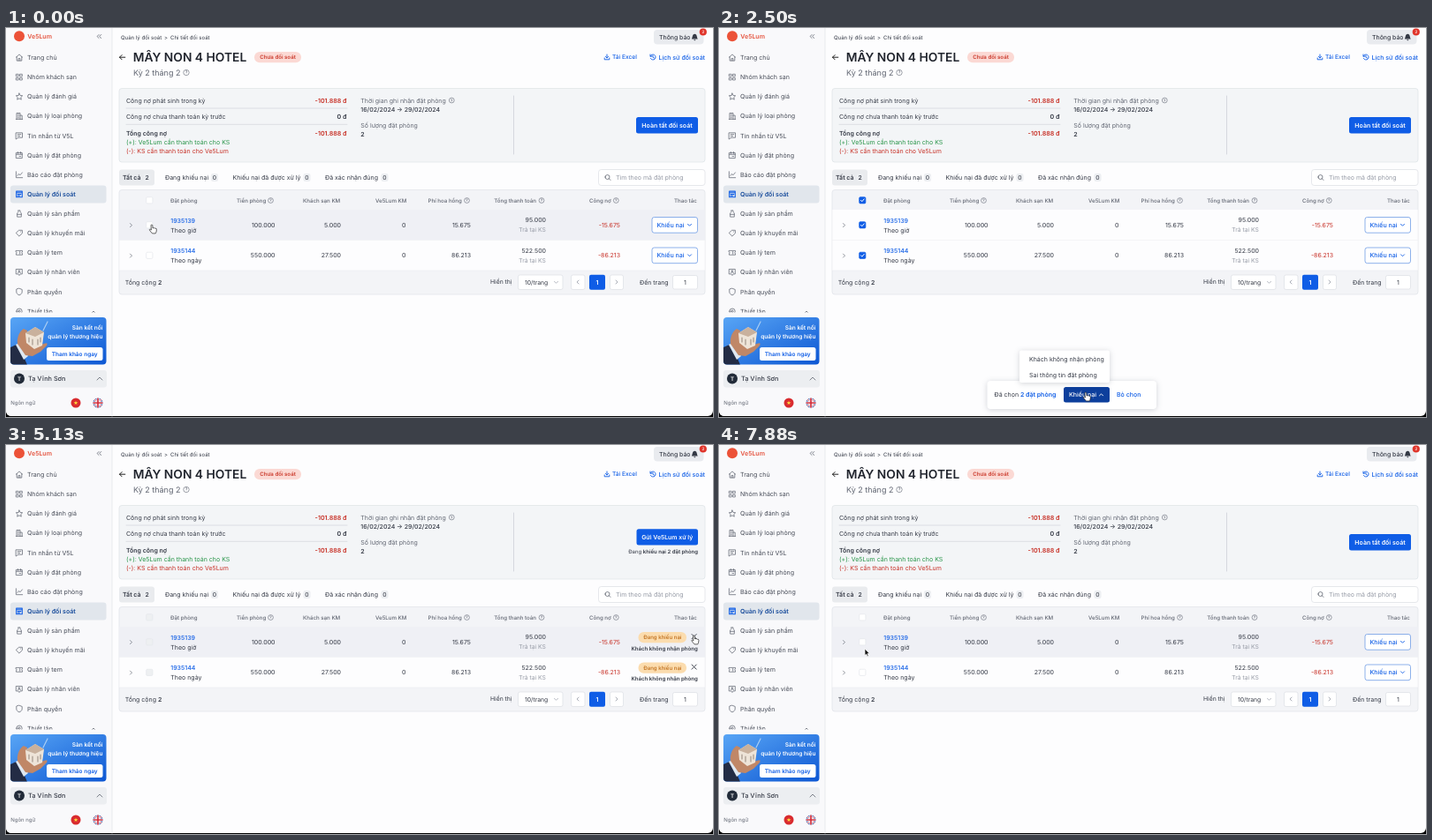
Write an HTML page that moves like this. It is 800 px wide and 441 px high and loops after 8000 ms.

```html
<!DOCTYPE html>
<html lang="vi">
<head>
<meta charset="utf-8">
<title>Đối soát</title>
<style>
html, body { margin: 0; width: 100%; height: 100%; overflow: hidden; background: #000; }
svg { display: block; width: 100%; height: 100%; font-family: Inter, Roboto, sans-serif; text-rendering: geometricPrecision; }
.soft { filter: drop-shadow(0 1px 3px rgba(30, 40, 60, .2)); }
</style>
</head>
<body>
<svg viewBox="0 0 800 441">
  <defs>
    <linearGradient id="sky" x2="1" y2="1"><stop stop-color="#58a5f5"/><stop offset="1" stop-color="#0d57d3"/></linearGradient>
    <clipPath id="menuClip"><path d="M0 0H120V322.5H0z"/></clipPath>
    <clipPath id="bannerClip"><rect x="5" y="328" width="108.5" height="53.5" rx="4"/></clipPath>
    <clipPath id="flagClip"><circle cx="104" cy="425" r="5.5"/></clipPath>
  </defs>
  <g id="page"></g>
  <g id="live"></g>
</svg>
<script>
const INK = '#343945', GREY = '#616672', PALE = '#969ba6', BLUE = '#0f5de6', RED = '#c72f25';
const BRAND = 'Ve5Lum';

// Text is placed by its vertical centre.
const text = (x, y, s, size = 7, weight = 400, fill = INK, anchor = 'start') =>
  `<text x="${x}" y="${y + size * .36}" font-size="${size}" font-weight="${weight}" fill="${fill}" text-anchor="${anchor}">${s}</text>`;
const right = (x, y, s, size, weight, fill) => text(x, y, s, size, weight, fill, 'end');
const mid = (x, y, s, size, weight, fill) => text(x, y, s, size, weight, fill, 'middle');
const box = (x, y, w, h, fill, r = 0, stroke = 'none', extra = '') =>
  `<rect x="${x}" y="${y}" width="${w}" height="${h}" rx="${r}" fill="${fill}" stroke="${stroke}" stroke-width=".7" ${extra}/>`;
const dot = (x, y, r, fill) => `<circle cx="${x}" cy="${y}" r="${r}" fill="${fill}"/>`;
const area = (d, fill) => `<path d="${d}" fill="${fill}"/>`;
const line = (x, y, d, stroke = GREY, w = .8) =>
  `<path transform="translate(${x} ${y})" d="${d}" fill="none" stroke="${stroke}" stroke-width="${w}" stroke-linecap="round" stroke-linejoin="round"/>`;
const help = (x, y, r = 2.9) =>
  `<circle cx="${x}" cy="${y}" r="${r}" fill="none" stroke="${GREY}" stroke-width=".6"/>` + mid(x, y, '?', r * 1.6, 500, GREY);
const DOWN = 'M-2-1 0 1 2-1', UP = 'M-2 1 0-1 2 1', NEXT = 'M-1-2 1 0-1 2', PREV = 'M1-2-1 0 1 2';
const ring = r => `M${-r} 0a${r} ${r} 0 1 1 ${2 * r} 0a${r} ${r} 0 1 1 ${-2 * r} 0z`;
const FRAME = 'M-3.3-3.3H3.3V3.3H-3.3z', SHIELD = 'M0-3.8 3.2-2.6V0C3.2 2 1.6 3.2 0 3.8-1.6 3.2-3.2 2-3.2 0V-2.6z';

const MENU = [
  ['Trang chủ', 'M-3.6-.3 0-3.6 3.6-.3M-2.8-1V3.6H2.8V-1M-.9 3.4V1H.9V3.4'],
  ['Nhóm khách sạn', 'M-3.3-3.3h2.4v2.4h-2.4zM.9-3.3h2.4v2.4H.9zM-3.3.9h2.4v2.4h-2.4zM.9.9h2.4v2.4H.9z'],
  ['Quản lý đánh giá', 'M0-3.7 1.1-1.3 3.7-1 1.8.8 2.3 3.4 0 2.1-2.3 3.4-1.8.8-3.7-1-1.1-1.3z'],
  ['Quản lý loại phòng', 'M-3 3.5V-3.5H1V3.5M1-.8H3.2V3.5M-3.7 3.5H3.7M-1.8-2H-.2M-1.8 0H-.2M-1.8 2H-.2'],
  ['Tin nhắn từ V5L', 'M-3.5-3.2H3.5V2.2H-1L-3.5 3.8zM-1.8-1.4H1.8M-1.8.4H.6'],
  ['Quản lý đặt phòng', 'M-3.3-2.6H3.3V3.4H-3.3zM-3.3-.8H3.3M-1.6-3.7V-1.8M1.6-3.7V-1.8M0 1.4H1.8'],
  ['Báo cáo đặt phòng', 'M-3.6-3.5V3.4H3.7M-2 1.2-.5-.8 1 .5 3.4-2.4'],
  ['Quản lý đối soát', FRAME + 'M-3.3-1.6H3.3M-1.8.2H1.8M-1.8 1.8H.4'],
  ['Quản lý sản phẩm', 'M-1-3.7H1V-2L2.3-.8V3.6H-2.3V-.8L-1-2zM-2.3.8H2.3'],
  ['Quản lý khuyến mãi', 'M0-3.4H3.4V0L0 3.5-3.5 0zM1.6-1.7h.2'],
  ['Quản lý tem', 'M-3.5-2.4H3.5V-.9C2.5-.9 2.5.9 3.5.9V2.4H-3.5V.9C-2.5.9-2.5-.9-3.5-.9zM.7-1.4V1.4'],
  ['Quản lý nhân viên', 'M-3.3-3.5H3.3V2H1.2L0 3.6-1.2 2H-3.3zM-1.7.8C-1-.5 1-.5 1.7.8M-.8-1.4a.8.8 0 1 0 1.6 0a.8.8 0 1 0-1.6 0'],
  ['Phân quyền', SHIELD],
  ['Thiết lập', ring(3.2) + ring(1.2)]
];

function banner() {
  return box(5, 328, 109, 54, 'url(#sky)') +
    area('M5 362 14 358 24 382H5z', '#232c45') + area('M11 359 16 356 25 372 20 376z', '#dfe8f2') +
    area('M13 358C12 350 16 343 20 341L24 343 23 349 40 359C45 357 48 356 46 360L39 367 30 372 22 371z', '#c08767') +
    area('M22 346 33 339 43 345 41 360 32 364 23 357z', '#eee4d8') + area('M22 346 33 339 43 345 33 350z', '#c9b19d') +
    line(0, 0, 'M26 351v5M30 353v6M36 353v6M39 351v5', '#a3978c', 1.2) +
    line(0, 0, 'M42 343 47 333', '#a9cdf3', 1.2) +
    right(109.5, 340, 'Sàn kết nối', 6.55, 600, '#fff') +
    right(109.5, 350, 'quản lý thương hiệu', 6.55, 600, '#fff') +
    box(46, 362, 63.5, 15, '#fff', 2.5) + mid(77.7, 369.5, 'Tham khảo ngay', 6.5, 600, BLUE);
}

function flags() {
  const cross = 'M-6 0H6M0-6V6', saltire = 'M-5-5 5 5M5-5-5 5';
  return dot(79, 425, 5.5, '#d92b2f') +
    area('M79 422.6 79.6 424.3H81.4L80 425.4 80.5 427 79 426 77.5 427 78 425.4 76.6 424.3H78.4z', '#ffdc3c') +
    '<g clip-path="url(#flagClip)">' + dot(104, 425, 6, '#2d4b9b') +
    line(104, 425, saltire, '#fff', 2) + line(104, 425, saltire, '#d3303d', .7) +
    line(104, 425, cross, '#fff', 3.2) + line(104, 425, cross, '#d3303d', 1.7) + '</g>';
}

function sidebar() {
  const items = MENU.map(([label, icon], i) => {
    const y = 33.5 + i * 22.13, on = i === 7;
    return (on ? box(5, y - 10, 108.5, 20, '#e1e6ec', 3) : '') +
      line(15, y, icon, on ? BLUE : GREY, on ? 1.1 : .75) +
      text(24, y, label, 7.05, on ? 600 : 400, on ? '#174b9b' : '#454a56');
  }).join('');
  return box(0, -10, 120, 450, '#f9f9fb', 6) + line(120, 0, 'M0 0V440', '#e4e6ea', .8) +
    dot(15, 9.3, 6, '#ec5238') + text(24.3, 9.5, BRAND, 7, 600, '#e5543f') +
    line(105.5, 9.5, 'M-.4-2-2.4 0-.4 2M2.2-2 .2 0 2.2 2') +
    `<g clip-path="url(#menuClip)">${items}${line(99, 322, UP)}</g>` +
    `<g clip-path="url(#bannerClip)">${banner()}</g>` +
    box(5, 388, 109, 19.5, '#eceef1', 3) + dot(15, 397.5, 6, '#222b39') + mid(15, 397.5, 'T', 6.2, 600, '#fff') +
    text(25, 397.5, 'Tạ Vĩnh Sơn', 7.3, 500) + line(106, 397.5, 'M-3 1.5 0-1.5 3 1.5') +
    text(5.3, 425, 'Ngôn ngữ', 6, 400, GREY) + flags();
}

function header() {
  return text(130, 11, 'Quản lý đối soát', 6.05) + text(179, 11, '&gt;', 6) + text(186, 11, 'Chi tiết đối soát', 6.05) +
    box(733, 2, 56.5, 16.5, '#e9ebef', 4) + text(739, 10.3, 'Thông báo', 6.9, 500) +
    area('M775.8 12.4C777 11 776.3 7 779.3 6.7 782.3 7 781.6 11 782.8 12.4zM778 13.2H780.6L779.3 14.5z', INK) +
    dot(788.8, 4.5, 4.1, '#e0352b') + mid(788.8, 4.5, '2', 4.6, 500, '#fff') +
    line(131.5, 33.2, 'M3.3 0H-3M-.4-2.6-3 0-.4 2.6', '#222', 1) +
    text(143.8, 33.2, 'MÂY NON 4 HOTEL', 13.8, 600, '#20242d') +
    box(281, 27, 53, 12.3, '#fbd9d4', 6.1) + mid(307.5, 33.2, 'Chưa đối soát', 6.1, 600, '#cb3a2c') +
    text(144, 50.3, 'Kỳ 2 tháng 2', 9, 400, GREY) + help(204, 50.5, 3.2) +
    line(680, 33, 'M0-3V1M-1.6-.6 0 1 1.6-.6M-2.8 1V2.8H2.8V1', BLUE, .9) + text(686, 33, 'Tải Excel', 6.6, 500, BLUE) +
    line(732, 33, 'M-2.8-1A3 3 0 1 1-2.6 1.5M-3-3V-.8H-1M0-1.5V.3L1.3 1', BLUE, .9) +
    right(791, 33, 'Lịch sử đối soát', 7, 500, BLUE);
}

function summary() {
  return box(128, 68.5, 663, 83.5, '#f3f5f7', 3, '#dde2e5') +
    text(136, 82, 'Công nợ phát sinh trong kỳ') + right(385.5, 82, '-101.888 đ', 7.1, 600, RED) +
    text(136, 100.5, 'Công nợ chưa thanh toán kỳ trước') + right(385.5, 100.5, '0 đ', 7.1, 600) +
    text(136, 119, 'Tổng công nợ', 7, 600) + right(385.5, 119, '-101.888 đ', 7.1, 600, RED) +
    line(136, 91, 'M0 0H250M0 18.3H250', '#cbcfd5', .6) +
    text(136, 129, `(+): ${BRAND} cần thanh toán cho KS`, 7, 400, '#269447') +
    text(136, 139, `(-): KS cần thanh toán cho ${BRAND}`, 7, 400, RED) +
    text(401.3, 82, 'Thời gian ghi nhận đặt phòng', 7, 400, GREY) + help(504.3, 82) +
    text(401.3, 92.5, '16/02/2024 → 29/02/2024', 7, 500) +
    text(401.3, 110.5, 'Số lượng đặt phòng', 7, 400, GREY) + text(401.3, 120.7, '2', 7, 600) +
    line(574.5, 77, 'M0 0V66', '#c8ccd3', .7);
}

function tabs() {
  const tab = (x, label, bx, n, w) => text(x, 169.5, label, 7, w) +
    box(bx - 4, 165, 8, 9, '#eceef1', 2) + mid(bx, 169.5, n, 6.8, w);
  return box(128, 160.5, 40, 18, '#e9ebee', 3) + tab(132, 'Tất cả', 159.5, 2, 600) +
    tab(180, 'Đang khiếu nại', 236, 0, 400) + tab(256.5, 'Khiếu nại đã được xử lý', 340.5, 0, 400) +
    tab(361, 'Đã xác nhận đúng', 428.5, 0, 400) +
    box(670.5, 160.5, 120.5, 18, '#fff', 3, '#dcdfe4') +
    line(680.5, 169, ring(2.5) + 'M1.8 1.8 3.5 3.5') + text(690, 169.5, 'Tìm theo mã đặt phòng', 7, 400, PALE);
}

function table() {
  const heads = [[186, 'Đặt phòng'], [261, 'Tiền phòng', 299.5], [336, 'Khách sạn KM'], [418, BRAND + ' KM'],
    [477.5, 'Phí hoa hồng', 521.5], [552.3, 'Tổng thanh toán', 606], [660, 'Công nợ', 690.3], [756, 'Thao tác']];
  return box(128, 183.5, 663, 118.5, '#f3f4f7', 3, '#e0e3e8') +
    heads.map(([x, s, h]) => text(x, 195.5, s, 6.15, 500, GREY) + (h ? help(h, 195.5) : '')).join('') +
    text(134.8, 288, 'Tổng cộng <tspan font-weight="600">2</tspan>') + text(548, 288, 'Hiển thị', 6.8) +
    box(579.5, 280, 50.5, 16.5, '#fff', 2, '#dcdfe4') + text(587, 288.3, '10/trang', 6.8) + line(622.5, 288.3, DOWN, PALE, .7) +
    box(639.5, 280, 15.5, 16.5, '#fff', 2, '#dcdfe4') + line(647, 288, PREV, PALE) +
    box(660, 279.8, 18, 17, BLUE, 2) + mid(669, 288.2, '1', 7, 600, '#fff') +
    box(683.5, 280, 15, 16.5, '#fff', 2, '#dcdfe4') + line(691, 288, NEXT, PALE) +
    text(717, 288, 'Đến trang') + box(754.5, 280.5, 28, 15.5, '#fff', 2, '#dcdfe4') + mid(768.5, 288.3, '1');
}

function check(y, state) {
  const on = state === 'on';
  return box(158.7, y - 3.6, 7.2, 7.2, on ? BLUE : state === 'off' ? '#eef0f2' : '#fff', 1.2, on ? BLUE : '#e4e7eb') +
    (on ? line(162.3, y, 'M-1.8 0-.5 1.4 1.9-1.4', '#fff', 1) : '');
}

const ROWS = [
  ['1935139', 'Theo giờ', '100.000', '5.000', '15.675', '95.000'],
  ['1935144', 'Theo ngày', '550.000', '27.500', '86.213', '522.500']
];
const ROW_TOP = 206, ROW_H = 34.5;

function row(i, checked, disputed, hover) {
  const [id, kind, price, promo, fee, total] = ROWS[i], y = ROW_TOP + 17.3 + i * ROW_H;
  const action = disputed
    ? box(715.5, y - 11.3, 54.5, 12.3, '#fbdcae', 6.1) + mid(742.8, y - 5.1, 'Đang khiếu nại', 6.1, 500, '#bd6a16') +
      line(778.6, y - 6.2, 'M-2.6-2.6 2.6 2.6M2.6-2.6-2.6 2.6', INK, .9) +
      right(782.8, y + 7.2, 'Khách không nhận phòng', 6.1, 600)
    : box(731, y - 8.8, 51.5, 17.7, '#fff', 2.5, '#5c90e2') + text(736.5, y, 'Khiếu nại', 7, 500, BLUE) + line(773.5, y, DOWN, BLUE, .9);
  return box(128.4, y - 17.3, 662.2, ROW_H, hover ? '#eff0f5' : '#fdfdfe') +
    line(128.4, y + 17.2, 'M0 0H662', '#e6e8ec', .6) + line(141.5, y + .3, NEXT, GREY, .7) +
    check(y, disputed ? 'off' : checked ? 'on' : '') +
    text(186.3, y - 5.2, id, 7, 500, BLUE) + text(186.3, y + 5.7, kind) +
    right(304.5, y, price) + right(379, y, promo) + right(452.5, y, '0') + right(526, y, fee) +
    right(611, y - 5.5, total) + right(611, y + 5.3, 'Trả tại KS', 6.8, 400, PALE) +
    right(695, y, '-' + fee, 7, 400, RED) + action;
}

function mainAction(count) {
  if (!count) return box(713, 101, 70, 18.5, BLUE, 2.5) + mid(748, 110.4, 'Hoàn tất đối soát', 7, 600, '#fff');
  return box(713.5, 95.3, 69.5, 18.2, BLUE, 2.5) + mid(748.2, 104.4, `Gửi ${BRAND} xử lý`, 6.9, 600, '#fff') +
    right(783, 121.3, `Đang <tspan font-weight="600">khiếu nại ${count} đặt phòng</tspan>`, 6);
}

function bulkBar(count, open) {
  return box(303.5, 400, 191.5, 32, '#fff', 4, 'none', 'class="soft"') +
    text(311.5, 415.8, `Đã chọn <tspan font-weight="600" fill="${BLUE}">${count} đặt phòng</tspan>`) +
    box(390, 407, 52, 17.5, open ? '#0d3f9c' : BLUE, 2.5) + text(396, 415.8, 'Khiếu nại', 7, 500, '#fff') +
    line(432.5, 415.8, UP, '#fff', .9) + text(450, 415.8, 'Bỏ chọn', 7, 500, BLUE) +
    (open ? box(340, 365.5, 102, 36.5, '#fff', 2, 'none', 'class="soft"') +
      text(351, 375, 'Khách không nhận phòng') + text(351, 393, 'Sai thông tin đặt phòng') : '');
}

// Pointer path: time, x, y, hand shape until the next point.
const PATH = [
  [0, 165, 223, 1], [375, 165, 223, 0], [625, 163, 257, 1], [1000, 163, 257, 0], [1750, 400.5, 397.5, 0],
  [2000, 400.5, 397.5, 0], [2250, 415, 413, 1], [2625, 415, 413, 0], [3000, 418, 371.5, 1], [3500, 416, 374, 0],
  [4500, 416, 374, 0], [5125, 778.5, 216, 1], [5750, 779.5, 217.5, 1], [6000, 778.5, 251, 1],
  [6375, 778.5, 251, 0], [6875, 405, 240.6, 0], [7000, 405, 240.6, 0], [7750, 165, 231, 0], [8000, 165, 231, 0]
];

function pointerAt(t) {
  const i = PATH.findIndex(p => p[0] > t), [t0, x0, y0, hand] = PATH[i - 1], [t1, x1, y1] = PATH[i];
  const u = (t - t0) / (t1 - t0), e = u * u * (3 - 2 * u);
  return { x: x0 + (x1 - x0) * e, y: y0 + (y1 - y0) * e, hand };
}

function pointer({ x, y, hand }) {
  const shape = hand
    ? 'M-1 .8C-1-.3.7-.3.8.8L1.1 4 1.6 3.4 2.5 4 3.3 3.6 4 4.4 5 4.3 5.4 5.6 5 8.2 4.2 9.9H.5L-1.8 7.2-2.7 5.7C-2.4 4.7-1.4 5.1-.6 6z'
    : 'M0 0V7.6L1.7 6.1 2.9 8.8 4.2 8.2 3 5.6H5.3z';
  return `<path transform="translate(${x} ${y})" d="${shape}" fill="${hand ? '#fff' : '#111'}" stroke="${hand ? '#222' : '#fff'}" stroke-width=".7" stroke-linejoin="round"/>`;
}

function live(t) {
  const p = pointerAt(t), sent = t >= 3500;
  const picked = [t >= 250 && !sent, t >= 750 && !sent];
  const disputed = [sent && t < 5500, sent && t < 6250];
  const count = flags => flags.filter(Boolean).length;
  const hovered = p.x > 128 ? Math.floor((p.y - ROW_TOP) / ROW_H) : -1;
  return mainAction(count(disputed)) +
    check(195.3, count(picked) === 2 ? 'on' : count(disputed) ? 'off' : '') +
    ROWS.map((_, i) => row(i, picked[i], disputed[i], hovered === i)).join('') +
    (count(picked) ? bulkBar(count(picked), t >= 2375) : '') + pointer(p);
}

const page = document.getElementById('page'), layer = document.getElementById('live');
page.innerHTML = box(0, -10, 800, 450, '#fdfdfe', 6) + sidebar() + header() + summary() + tabs() + table();

const STEP = 125, LOOP = 8000;
const start = performance.now();
let shown = -1;
function tick() {
  const t = Math.floor((performance.now() - start) % LOOP / STEP) * STEP;
  if (t !== shown) layer.innerHTML = live(shown = t);
  requestAnimationFrame(tick);
}
tick();
</script>
</body>
</html>
```
